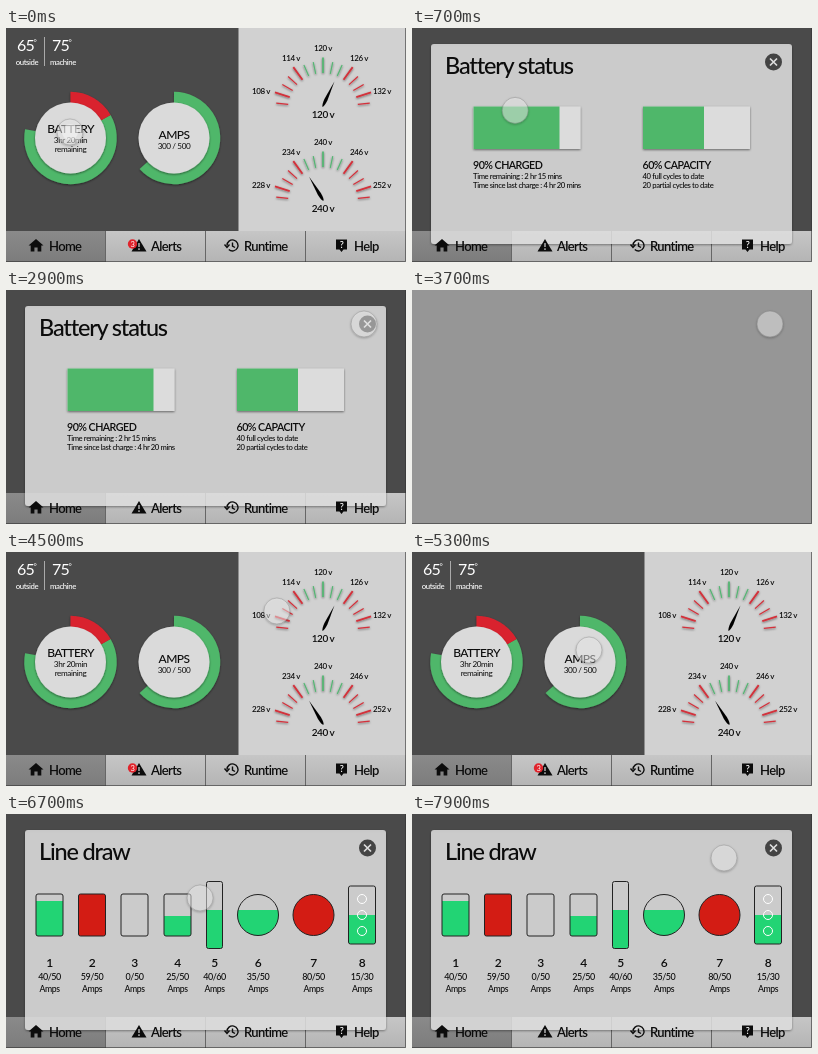
These frames come from a looping animation (400 by 234 pixels, 8000 ms). An HTML page:

```html
<!DOCTYPE html>
<html lang="en">
<head>
<meta charset="utf-8">
<title>Power panel</title>
<style>
  html, body { margin: 0; width: 100%; height: 100%; overflow: hidden; background: #4a4a4a; }
  svg { display: block; width: 400px; height: 234px; }
  text { font-family: Lato, "Open Sans", sans-serif; letter-spacing: -.05em; fill: #0c0c0c; }
  .mid { text-anchor: middle; }
  .white { fill: #fff; }
  .medium { font-weight: 500; }
  .bold { font-weight: 600; }
</style>
</head>
<body>
<svg id="stage" viewBox="0 0 400 234">
  <defs>
    <linearGradient id="tab" x2="0" y2="1"><stop stop-color="#c6c6c6"/><stop offset="1" stop-color="#b4b4b4"/></linearGradient>
    <linearGradient id="active" x2="0" y2="1"><stop stop-color="#8a8a8a"/><stop offset="1" stop-color="#7c7c7c"/></linearGradient>
    <filter id="shadow" x="-20%" y="-20%" width="140%" height="140%">
      <feDropShadow dx="0" dy="1" stdDeviation="1.2" flood-opacity=".5"/>
    </filter>
  </defs>
  <rect width="400" height="234" fill="#4a4a4a"/>
  <g id="nav"></g>
  <g id="dashboard"></g>
  <g id="battery"></g>
  <g id="lines"></g>
  <g id="labels"></g>
  <g id="badge"></g>
  <rect id="cover" width="400" height="234" fill="#969696"/>
  <path d="M399.5 0V233.5H0" fill="none" stroke="#333" stroke-opacity=".6"/>
  <g id="cursor">
    <circle r="13" fill="#fff" fill-opacity=".4" stroke="#777" stroke-opacity=".35" filter="url(#shadow)"/>
    <circle id="press" r="8" fill="#fff"/>
  </g>
</svg>
<script>
const $ = id => document.getElementById(id);
const text = (x, y, size, str, cls = '') =>
  `<text x="${x}" y="${y}" font-size="${size}" class="${cls}">${str}</text>`;
const rect = (x, y, w, h, fill, extra = '') =>
  `<rect x="${x}" y="${y}" width="${w}" height="${h}" fill="${fill}" ${extra}/>`;
const circle = (x, y, r, fill, extra = '') =>
  `<circle cx="${x}" cy="${y}" r="${r}" fill="${fill}" ${extra}/>`;
const path = (d, extra = '') => `<path d="${d}" ${extra}/>`;

// Point at a clockwise angle from twelve o'clock
const polar = (x, y, r, deg) => {
  const a = deg * Math.PI / 180;
  return `${(x + r * Math.sin(a)).toFixed(2)} ${(y - r * Math.cos(a)).toFixed(2)}`;
};

function arc(x, y, from, to, color) {
  const large = to - from > 180 ? 1 : 0;
  return path(`M${polar(x, y, 40.5, from)}A40.5 40.5 0 ${large} 1 ${polar(x, y, 40.5, to)}`,
    `fill="none" stroke="${color}" stroke-width="11.5"`);
}

function dial(x, arcs, title, notes) {
  const paired = notes.length > 1;
  return `<g filter="url(#shadow)">${arcs.map(a => arc(x, 110, ...a)).join('')}</g>` +
    circle(x, 110, 35.5, '#dadada', 'filter="url(#shadow)"') +
    text(x, paired ? 105 : 111, 12, title, 'mid medium') +
    notes.map((n, i) => text(x, (paired ? 115 : 120.5) + 9 * i, 8.2, n, 'mid')).join('');
}

function gauge(y, volts, step, angle) {
  let ticks = '';
  for (let i = -7; i <= 7; i++) {
    const major = i % 3 === 0;
    ticks += path(`M${polar(317, y, major ? 50.5 : 47, i * 12)}L${polar(317, y, 35, i * 12)}`,
      `stroke="${Math.abs(i) < 3 ? '#55b573' : '#d3303a'}" stroke-width="${major ? 1.8 : 1.2}"`);
  }
  const spots = [[255, -14], [285, -47], [317, -57], [353, -47], [376, -14]];
  return `<g filter="url(#shadow)">${ticks}</g>` +
    spots.map(([x, dy], i) => text(x, y + dy, 8, `${volts + (i - 2) * step} v`, 'mid bold')).join('') +
    text(317, y + 10, 10, `${volts} v`, 'mid bold') +
    path('M0-27L1.7-7Q1.5 0 0 1Q-1.5 0-1.7-7Z', `transform="translate(317 ${y - 2}) rotate(${angle})"`);
}

function modal(title, body) {
  return rect(19, 16, 361, 200, '#e6e6e6', 'fill-opacity=".8" rx="3" filter="url(#shadow)"') +
    text(33, 46, 23.5, title, 'medium') + circle(361.5, 34, 8.5, '#444') +
    path('M358 30.5l7 7m0-7l-7 7', 'stroke="#ddd" stroke-width="1.7"') + body;
}

function bar(x, fill, title, ...notes) {
  return rect(x + .5, 78.5, 107, 42.5, '#dcdcdc', 'filter="url(#shadow)"') +
    rect(x + .5, 78.5, fill, 42.5, '#4fb76a') +
    text(x, 141, 10.7, title, 'bold') + notes.map((n, i) => text(x, 151 + 9 * i, 7.7, n, 'medium')).join('');
}

// A breaker symbol: box or circle filled with colour from `level` down
function breaker([x, w, h, level, load, round], i) {
  const top = 101 - h / 2, color = load[0] > load[1] ? '#d31c14' : '#22d474', r = round ? w / 2 : 2;
  const outline = (fill, extra) => rect(x - w / 2, top, w, h, fill, `rx="${r}" ${extra}`);
  return `<clipPath id="level${i}">${rect(0, level, 400, 100, '#000')}</clipPath>` +
    outline(color, `clip-path="url(#level${i})"`) + outline('none', 'stroke="#222"') +
    text(x, 153, 12, i + 1, 'mid bold') + text(x, 166, 9, load.join('/'), 'mid medium') +
    text(x, 178, 8.7, 'Amps', 'mid medium');
}

const icons = [
  path('M30 211l-7.500 6.500h2.200v6h3.700v-4h3.200v4h3.700v-6h2.200z', 'fill="#0c0c0c"'),
  path('M133 211l7.500 12.500h-15z', 'fill="#0c0c0c"') + path('M133 215v4m0 1.300v1.700', 'stroke="#bbb" stroke-width="1.400"'),
  path('M221 217.500a5.500 5.500 0 1 1 1.800 4M218.500 216.500l2.500 3 2.500-3M226.500 214.500v3.500l2.500 1.500', 'fill="none" stroke="#0c0c0c" stroke-width="1.400"'),
  path('M330 211.500h11v10h-3.500l-2 2.500-2-2.500h-3.500z', 'fill="#0c0c0c"') + text(335.5, 220, 9, '?', 'mid white bold')
];
const tabs = ['Home', 'Alerts', 'Runtime', 'Help'];
$('nav').innerHTML = tabs.map((name, i) =>
  rect(i * 100, 203, 100, 31, `url(#${i ? 'tab' : 'active'})`) +
  (i ? path(`M${i * 100 - .5} 203v31`, 'stroke="#666"') : '')).join('');
$('labels').innerHTML = tabs.map((name, i) =>
  icons[i] + text([43, 145, 238, 348][i], 222.5, 13, name, 'bold')).join('');
$('badge').innerHTML = circle(126.5, 216, 4.7, '#e0242c') + text(126.5, 218.6, 7.5, '3', 'mid white');

const temperature = (x, value, place, middle) =>
  text(x, 22.5, 16, value, 'mid white') + text(x + 8, 17, 8, '°', 'white medium') +
  text(middle, 36.5, 7.8, place, 'mid white medium');

const GREEN = '#4fb76a', RED = '#d9232e';
$('dashboard').innerHTML =
  rect(232.5, 0, 167.5, 203, '#d1d1d1') +
  temperature(19.5, 65, 'outside', 21) + path('M38.500 9v29', 'stroke="#aaa"') +
  temperature(54.5, 75, 'machine', 57) +
  dial(64.5, [[60, 281, GREEN], [0, 60, RED]], 'BATTERY', ['3hr 20min', 'remaining']) +
  dial(168, [[0, 228, GREEN]], 'AMPS', ['300 / 500']) +
  gauge(80, 120, 6, 25) + gauge(174, 240, 6, -31);

$('battery').innerHTML = modal('Battery status',
  bar(61, 86, '90% CHARGED', 'Time remaining : 2 hr 15 mins', 'Time since last charge : 4 hr 20 mins') +
  bar(230.5, 61, '60% CAPACITY', '40 full cycles to date', '20 partial cycles to date'));

$('lines').innerHTML = modal('Line draw', [
  [43.5, 27, 42, 87, [40, 50]], [86, 27, 42, 80, [59, 50]],
  [128.5, 27, 42, 130, [0, 50]], [171.5, 27, 42, 102, [25, 50]],
  [208.5, 16, 67, 96, [40, 60]], [252, 41, 41, 96, [35, 50], true],
  [307.5, 41, 41, 80, [80, 50], true], [356, 27, 58, 101, [15, 30]]
].map(breaker).join('') +
  [85, 101, 117].map(y => circle(356, y, 4.5, 'none', 'stroke="#fff"')).join(''));

// Cursor stops: time, x, y
const route = [
  [0, 64, 104], [300, 64, 104], [1100, 142, 61], [1300, 142, 61], [1800, 298, 32], [2100, 323, 28],
  [2900, 358, 34], [3700, 358, 34], [4500, 271, 59], [5300, 177, 98], [6400, 177, 98],
  [6700, 194, 84], [7200, 245, 66], [7900, 312, 44], [8000, 312, 44]
];
const slope = (i, k) => route[i + 1] && route[i]
  ? (route[i + 1][k] - route[i][k]) / (route[i + 1][0] - route[i][0]) : 0;
const tangent = (i, k) => {
  const a = slope(i - 1, k), b = slope(i, k);
  return a * b > 0 ? 2 * a * b / (a + b) : 0;
};
// Monotone cubic through the stops
function along(t, k) {
  const i = route.findIndex(p => p[0] > t) - 1, [p, q] = [route[i], route[i + 1]];
  const d = q[0] - p[0], u = (t - p[0]) / d, s = u * u * (3 - 2 * u);
  return p[k] + (q[k] - p[k]) * s +
    d * u * (1 - u) * ((1 - u) * tangent(i, k) - u * tangent(i + 1, k));
}

const ramp = (t, from, to) => Math.min(1, Math.max(0, (t - from) / (to - from)));
const pulse = (t, at) => Math.max(0, 1 - Math.abs(t - at) / 200);
const fade = (id, opacity) => $(id).setAttribute('opacity', opacity);

function draw(now) {
  const t = now % 8000;
  const battery = t < 3700 ? ramp(t, 50, 700) : 0, lines = ramp(t, 5450, 6200);
  fade('battery', battery);
  fade('lines', lines);
  fade('dashboard', 1 - Math.max(battery, lines));
  fade('badge', 1 - Math.max(battery, lines));
  fade('cover', t < 3700 ? 0 : 1 - ramp(t, 3780, 4400));
  fade('press', .4 * (pulse(t, 0) + pulse(t, 3300) + pulse(t, 5500)));
  $('cursor').setAttribute('transform', `translate(${along(t, 1)} ${along(t, 2)})`);
  requestAnimationFrame(draw);
}
requestAnimationFrame(draw);
</script>
</body>
</html>
```
